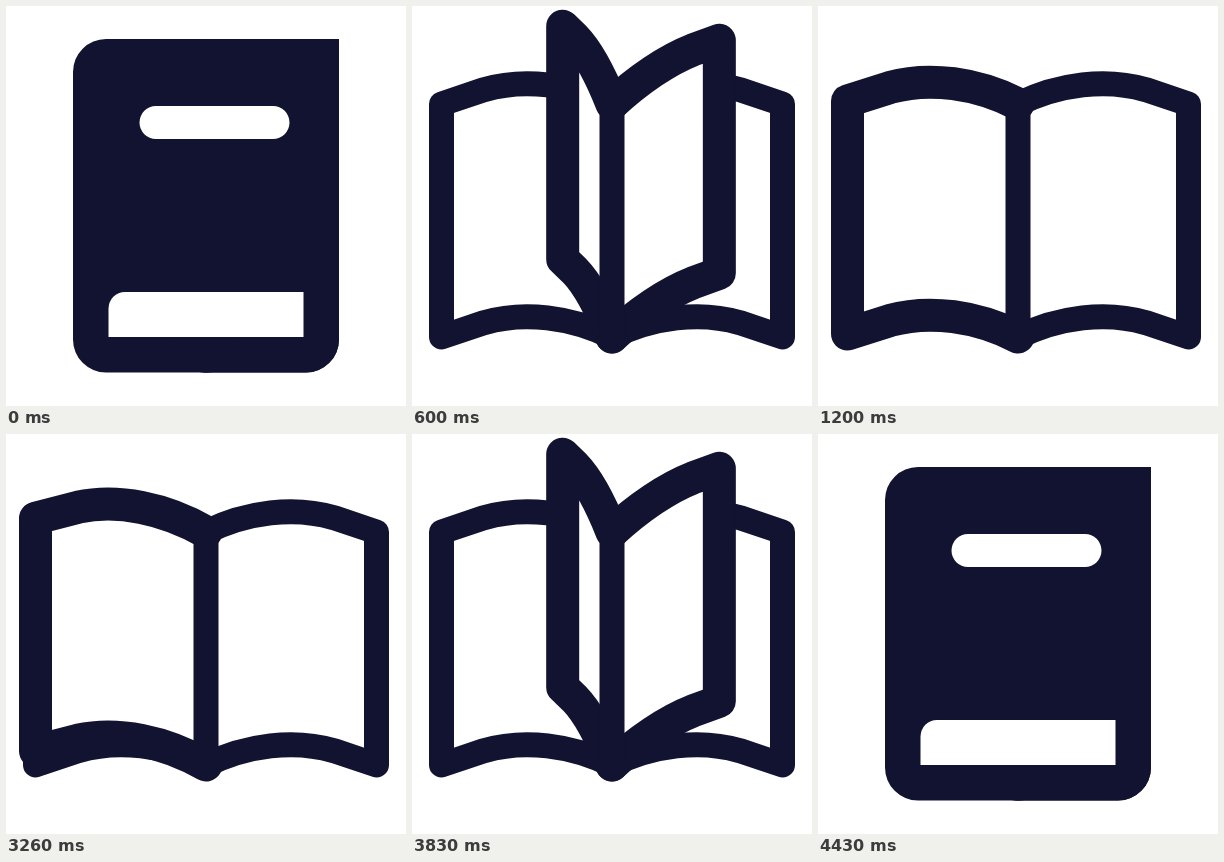
Recreate the animation shown at these times as an HTML page. Size 400 by 400 pixels, loop 5.46 s.

```html
<!DOCTYPE html>
<html lang="en">
<head>
<meta charset="utf-8">
<title>Book</title>
<style>
  html, body { margin: 0; width: 100%; height: 100%; overflow: hidden; background: #fff; }
  svg { display: block; width: 100vw; height: 100vh; }
  path { stroke-linecap: round; stroke-linejoin: round; }
</style>
</head>
<body>
<svg id="stage" viewBox="0 0 400 400"></svg>
<script>
const INK = '#121331';
const STEP = 30, LOOP = 5460, OPEN = 1200, CLOSED_AT = 4430;
const LIFTED = 330, COVER_DOWN = 510;
const TURN = 0.36;                       // degrees per ms
const STARTS = [8, 304, 458, 692];       // cover, then three leaves
const TOP = 98, DROP = 233, BOW = 26;
const svg = document.getElementById('stage');

const mix = (a, b, k) => a + (b - a) * k;
const clamp = (v, lo, hi) => Math.min(hi, Math.max(lo, v));

// A sheet hangs on the spine; its long edges bow up, then run straight to the free side.
function sheet({ spine, x, y, bow, width, fill = 'none', top = TOP, drop = DROP }) {
  const at = (f, lift, dy) => `${mix(spine, x, f)} ${mix(top, y, f) - bow * lift + dy} `;
  const d = `M${at(0, 0, 0)}C${at(.24, .78, 0)}${at(.52, 1, 0)}${at(.75, .55, 0)}L${at(1, 0, 0)}` +
    `V${y + drop}L${at(.75, .55, drop)}C${at(.52, 1, drop)}${at(.24, .78, drop)}${at(0, 0, drop)}`;
  return `<path d="${d}" fill="${fill}" stroke="${INK}" stroke-width="${width}"/>`;
}

const spineLine = (x, top, drop, width) =>
  `<path d="M${x} ${top}v${drop}" stroke="${INK}" stroke-width="${width}"/>`;

// White opening: left and right top corners, height, bow, first radius, other radii.
function opening([x0, y0, x1, y1, h, bow, r, q]) {
  const mx = (x0 + x1) / 2, my = (y0 + y1) / 2 - bow;
  const arc = (rad, x, y) => `A${rad} ${rad} 0 0 1 ${x} ${y}`;
  const d = `M${x0} ${y0 + r}${arc(r, x0 + r, y0)}Q${mx} ${my} ${x1 - q} ${y1}` +
    `${arc(q, x1, y1 + q)}V${y1 + h - q}${arc(q, x1 - q, y1 + h)}` +
    `Q${mx} ${my + h} ${x0 + q} ${y0 + h}${arc(q, x0, y0 + h - q)}Z`;
  return `<path d="${d}" fill="#fff"/>`;
}

const openings = [
  { shut: [133.5, 100, 283.5, 100, 33, 0, 16.5, 16.5], lifted: [155, 56, 198, 104, 184, 0, 0, 0] },
  { shut: [102.5, 286, 297.5, 286, 45, 0, 16.5, 0], lifted: [231, 107, 354, 97, 199, 21, 0, 0] }
];
const halves = [
  { from: 100, x: 138.5, y: 18.5, bow: 10 },
  { from: 300, x: 370.5, y: 82, bow: BOW },
  { from: 300, x: 370.5, y: TOP, bow: BOW }
];

// The solid book stretches until the cover stands up.
function lifting(k) {
  const spine = mix(200, 214.5, k), width = mix(66, 33, k);
  const top = mix(66, TOP, k), drop = mix(267.5, DROP, k);
  const ink = halves.map(h => sheet({
    spine, width, top, drop, fill: INK,
    x: mix(h.from, h.x, k), y: mix(66, h.y, k), bow: h.bow * k
  })).join('');
  const size = 33 * (1 - k), right = mix(333, 387, k);
  const corner = `<path d="M${right} ${mix(33, 66, k)}v${size}h${-size}v${-size}z" fill="${INK}"/>`;
  const holes = openings.map(o => opening(o.shut.map((v, i) => mix(v, o.lifted[i], k)))).join('');
  return ink + spineLine(spine, top, drop, width) + corner + holes;
}

function leaf(spine, angle) {
  const a = angle * Math.PI / 180, c = Math.cos(a), s = Math.sin(a);
  const reach = c > 0 ? 371 - spine : spine - 27;
  return sheet({
    spine, width: 33, fill: '#fff',
    x: Math.max(29.5, spine + reach * c), y: 95 - 78 * s,
    bow: 12 + 14 * c ** 4 - 6 * s * c
  });
}

function turning(t) {
  const k = clamp((t - LIFTED) / (COVER_DOWN - LIFTED), 0, 1);
  const spine = mix(214.5, 200, k), width = mix(33, 25, k);
  const sides = t < COVER_DOWN ? [370.5] : [370.5, 29.5];
  const base = sides.map(x => sheet({ spine, x, y: TOP, bow: BOW, width })).join('');

  const last = STARTS.length - 1;
  const flat = a => Math.abs(a - 90);
  const leaves = STARTS.map(s => (t - s) * TURN)
    .filter((a, i) => a > 0 && (a < 180 || i === last))
    .map(a => Math.min(a, 180))
    .sort((a, b) => flat(b) - flat(a))
    .map(a => leaf(spine, a)).join('');
  return base + leaves + spineLine(spine, TOP, DROP, width);
}

// Opening time shown at a moment of the loop; closing runs it backwards.
function phase(ms) {
  const t = ms % LOOP;
  const n = t < CLOSED_AT / 2 ? Math.floor(t / STEP) : Math.ceil((CLOSED_AT - t) / STEP);
  return clamp(n * STEP, 0, OPEN);
}

let shown = -1;
const begin = performance.now();
function tick() {
  const t = phase(performance.now() - begin);
  if (t !== shown) {
    shown = t;
    svg.innerHTML = t <= LIFTED ? lifting(t / LIFTED) : turning(t);
  }
  requestAnimationFrame(tick);
}
tick();
</script>
</body>
</html>
```
